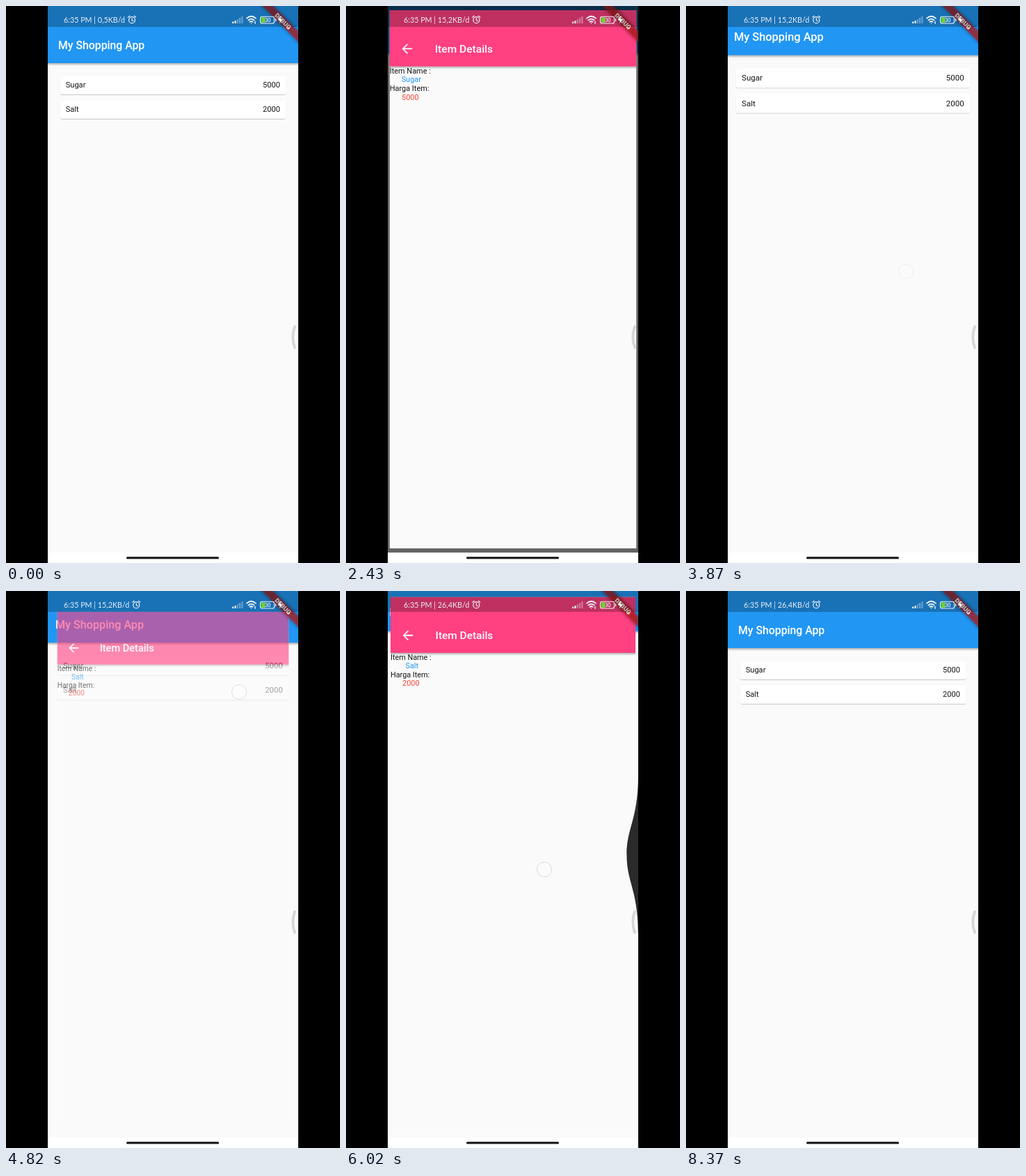
An HTML page for the animation above (8.41 s loop, 480 px wide and 800 px high).

```html
<!DOCTYPE html>
<html lang="en">
<head>
<meta charset="utf-8">
<title>Shopping list</title>
<style>
  html, body { margin: 0; width: 100%; height: 100%; overflow: hidden; background: #000; }
  svg { display: block; width: 480px; height: 800px; }
  text { font-family: Roboto, Arial, sans-serif; font-size: 11.1px; fill: #151515; }
  .title { font-size: 15.8px; font-weight: 500; fill: #fff; }
  .end { text-anchor: end; }
  .mid { text-anchor: middle; }
  .paper { fill: #fafafa; }
  .status text { font-family: Lato, "Open Sans", sans-serif; font-size: 10.75px; fill: #e8eef5; }
  .line { fill: none; stroke: #eef3f8; stroke-linecap: round; }
</style>
</head>
<body>
<svg viewBox="0 0 480 800">
  <defs>
    <clipPath id="screen"><path d="M60 0H420V785H60Z"/></clipPath>
    <linearGradient id="shade" x2="0" y2="1">
      <stop offset="0" stop-color="#000" stop-opacity=".3"/>
      <stop offset="1" stop-color="#000" stop-opacity="0"/>
    </linearGradient>
    <filter id="soft" x="-10%" y="-30%" width="120%" height="170%">
      <feDropShadow dx="0" dy=".8" stdDeviation=".7" flood-color="#000" flood-opacity=".25"/>
    </filter>
    <filter id="glow" x="-20%" y="-80%" width="140%" height="260%">
      <feDropShadow dx="0" dy="0" stdDeviation="2.5" flood-color="#000" flood-opacity=".8"/>
    </filter>
  </defs>
  <rect width="480" height="800"/>
  <rect x="60" y="785" width="360" height="15" fill="#fff"/>
  <rect x="173" y="791" width="133" height="3.2" rx="1.5" fill="#222"/>

  <g clip-path="url(#screen)">
    <g id="list">
      <rect class="paper" x="60" width="360" height="785"/>
      <rect x="60" width="360" height="82" fill="#2196f3"/>
      <rect x="60" y="82" width="360" height="4" fill="url(#shade)"/>
      <text class="title" x="75" y="62">My Shopping App</text>
      <g filter="url(#soft)" fill="#fff">
        <rect x="77.5" y="100.5" width="325" height="26.5" rx="3.5"/>
        <rect x="77.5" y="135.5" width="325" height="26.5" rx="3.5"/>
      </g>
      <text x="85.7" y="117.4">Sugar</text>
      <text class="end" x="394" y="117.4">5000</text>
      <text x="85.7" y="152.4">Salt</text>
      <text class="end" x="394" y="152.4">2000</text>
    </g>
    <rect id="scrim" x="60" width="360" height="785"/>
    <g id="detail">
      <rect class="paper" x="60" width="360" height="785"/>
      <rect x="60" width="360" height="82" fill="#ff4081"/>
      <rect x="60" y="82" width="360" height="4" fill="url(#shade)"/>
      <path d="M93 56.3H79.6M86 49.6L79.3 56.3L86 63" fill="none" stroke="#fff" stroke-width="1.8"/>
      <text class="title" x="126" y="62">Item Details</text>
      <text x="60" y="92.3">Item Name :</text>
      <text id="name" class="mid" x="91.5" y="105" style="fill:#2196f3"></text>
      <text x="60" y="117.8">Harga Item:</text>
      <text id="price" class="mid" x="90" y="130.5" style="fill:#f44336"></text>
    </g>
    <g transform="translate(420 0) rotate(45)">
      <rect x="-45" y="25.5" width="90" height="11" fill="#b71c1c" fill-opacity=".63" filter="url(#glow)"/>
      <text class="mid" y="34.2" style="font-size:9px;font-weight:900;fill:#fff">DEBUG</text>
    </g>
    <rect x="60" width="360" height="30" fill-opacity=".25"/>
  </g>

  <g class="status">
    <text id="speed" x="83" y="23.8"></text>
    <g id="alarm" class="line" stroke-width="1.2">
      <circle cy="20.2" r="4.5"/>
      <path d="M0 17.7V20.5L2 21.6M-5.6 16.2L-3.2 14.2M5.6 16.2L3.2 14.2"/>
    </g>
    <g stroke="#e8eef5" stroke-width="2.1">
      <path d="M326.2 25V22.5M329.5 25V21"/>
      <path d="M332.8 25V19M336.1 25V17M339.4 25V15" opacity=".4"/>
    </g>
    <g class="line" stroke-width="1.8">
      <path d="M346 17.6Q352.5 11.8 359 17.6M348.3 20.4Q352.5 16.8 356.7 20.4M350.4 22.8Q352.5 21.2 354.6 22.8"/>
      <path d="M352.5 24.6V24.7M358 22.5V25.2" stroke-width="1.4"/>
    </g>
    <rect x="366.8" y="16.4" width="5.5" height="7.6" fill="#6ad52c"/>
    <rect class="line" x="365.5" y="15.2" width="20" height="9.8" rx="2.6" stroke-width="1.1"/>
    <path d="M387.6 18.5V21.7" class="line" stroke-width="1.3"/>
    <text class="mid" x="376" y="22.8" style="font-size:7.5px;font-weight:700">30</text>
    <path d="M395.2 14.5L390.8 20.8H393.8L392.8 25.2L397.3 18.8H394.3Z" fill="#f5f5f5"/>
  </g>

  <path id="bulge" fill="#2a2a2a"/>
  <path d="M415 460.5Q409.5 475.5 415 490.5" fill="none" stroke="#d6d6d6" stroke-width="3.8" stroke-linecap="round"/>
  <circle id="touch" r="10.5" fill="#fff" fill-opacity=".85" stroke="#c4c4c8" stroke-width="1"/>
</svg>
<script>
const LOOP = 8410, TRANSITION = 300;
const visits = [
  { open: 2319, close: 3811, name: "Sugar", price: "5000" },
  { open: 4768, close: 5979, name: "Salt", price: "2000" }
];
const touches = [
  { down: 2235, up: 2319, from: [330, 114], to: [330, 114] },
  { down: 3560, up: 3786, from: [416, 371], to: [316, 381], swipe: true },
  { down: 4685, up: 4768, from: [335, 145], to: [335, 145] },
  { down: 5755, up: 5980, from: [416, 378], to: [285, 400], swipe: true }
];
const el = id => document.getElementById(id);
const clamp = v => Math.max(0, Math.min(1, v));
const span = (v, a, b) => clamp((v - a) / (b - a));
const mix = (a, b, k) => a + (b - a) * k;

function cubic(u, a, b, c, d) {
  const v = 1 - u;
  return v * v * v * a + 3 * v * v * u * b + 3 * v * u * u * c + u * u * u * d;
}

// Two joined cubics: a short ramp, then a long settling tail.
function ease(p) {
  const [xs, ys] = p < 1 / 6
    ? [[0, .05, .133333, 1 / 6], [0, 0, .06, .4]]
    : [[1 / 6, .208333, .25, 1], [.4, .82, 1, 1]];
  let lo = 0, hi = 1;
  for (let i = 0; i < 24; i++) {
    const u = (lo + hi) / 2;
    if (cubic(u, ...xs) < p) lo = u; else hi = u;
  }
  return cubic(lo, ...ys);
}

function zoom(node, scale, opacity) {
  node.setAttribute("transform", `translate(240 392.5) scale(${scale}) translate(-240 -392.5)`);
  node.setAttribute("opacity", opacity);
}

function drawPages(t) {
  let listScale = 1, detailScale = 1, opacity = 0, scrim = 0;
  const visit = visits.find(v => t >= v.open && t < v.close + TRANSITION);
  if (visit) {
    const closing = t >= visit.close;
    const p = clamp((t - (closing ? visit.close : visit.open)) / TRANSITION);
    const e = ease(p);
    if (closing) {
      listScale = mix(1.1, 1, e);
      detailScale = mix(1, .9, e);
      opacity = 1 - span(p, .16, .195);
    } else {
      listScale = mix(1, 1.05, e);
      detailScale = mix(.85, 1, e);
      opacity = span(p, .1, .225);
      scrim = .6 * span(p, .2075, .36);
    }
    el("name").textContent = visit.name;
    el("price").textContent = visit.price;
  }
  zoom(el("list"), listScale, 1);
  zoom(el("detail"), detailScale, opacity);
  el("scrim").setAttribute("opacity", scrim);
}

function drawTouch(t) {
  const touch = touches.find(s => t >= s.down && t < s.up + 110);
  let opacity = 0, bulge = "";
  if (touch) {
    const { down, up, from, to } = touch;
    const k = Math.sin(span(t, down, up) * Math.PI / 2);
    el("touch").setAttribute("cx", mix(from[0], to[0], k));
    el("touch").setAttribute("cy", mix(from[1], to[1], k));
    opacity = 1 - span(t, up, up + 110);
    if (touch.swipe) {
      const y = from[1] + 1, x = 420 - 34 * k * (1 - span(t, up, up + 80));
      if (x < 419.9) bulge = `M420 ${y - 116}C420 ${y - 50} ${x} ${y - 40} ${x} ${y}` +
        `C${x} ${y + 40} 420 ${y + 50} 420 ${y + 116}Z`;
    }
  }
  el("touch").setAttribute("opacity", opacity);
  el("bulge").setAttribute("d", bulge);
}

function drawStatus(t) {
  const rate = t < 1100 ? "0,5" : t < 5100 ? "15,2" : "26,4";
  el("speed").textContent = `6:35 PM | ${rate}KB/d`;
  el("alarm").setAttribute("transform", `translate(${t < 1100 ? 181 : 187.3} 0)`);
}

const start = performance.now();
function frame() {
  const t = (performance.now() - start) % LOOP;
  drawPages(t);
  drawTouch(t);
  drawStatus(t);
  requestAnimationFrame(frame);
}
frame();
</script>
</body>
</html>
```
